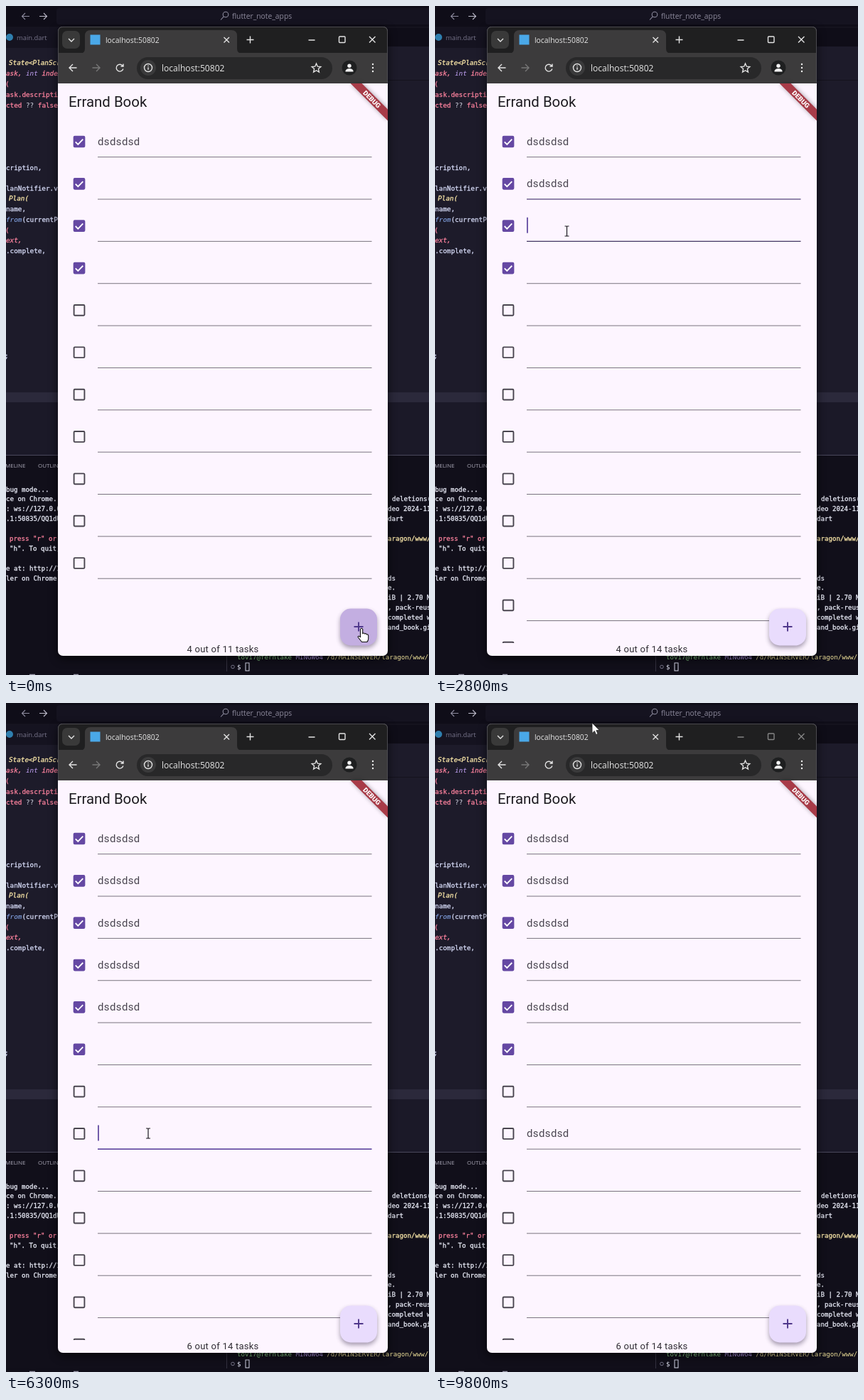
Write an HTML page that moves like this. It is 595x942 px and loops after 9900 ms.

```html
<!DOCTYPE html>
<html lang="en">
<head>
<meta charset="utf-8">
<title>Task list</title>
<style>
  html, body { margin: 0; width: 100%; height: 100%; overflow: hidden; background: #1d1b2a; }
  svg { display: block; width: 595px; height: 942px; }
  text { white-space: pre; }
  .ui { font-family: "Open Sans", "Noto Sans", sans-serif; }
  .app { font-family: Roboto, sans-serif; }
  .mono { font-family: "DejaVu Sans Mono", monospace; font-size: 9.15px; stroke-width: .3px; }
  .code { font-size: 9.3px; }
  .icon { fill: none; stroke: #e3e3e3; stroke-width: 1.4; }
  .dim { stroke: #858585; }
  .row text { font-size: 14.83px; letter-spacing: .463px; fill: #49454f; }
</style>
</head>
<body>
<svg viewBox="0 0 595 942" xmlns="http://www.w3.org/2000/svg">
  <defs>
    <clipPath id="frame"><rect x="73" y="29" width="464" height="886" rx="7"/></clipPath>
    <clipPath id="body"><rect x="73" y="162" width="464" height="735"/></clipPath>
    <filter id="soft" x="-30%" y="-30%" width="160%" height="160%"><feGaussianBlur stdDeviation="3"/></filter>
    <filter id="wide" x="-10%" y="-10%" width="120%" height="120%"><feGaussianBlur stdDeviation="7"/></filter>
  </defs>

  <!-- editor behind the browser -->
  <rect width="595" height="942" fill="#1d1b2a"/>
  <rect width="595" height="57" fill="#0f0d18"/>
  <rect x="71" y="3" width="540" height="23" rx="4" fill="#151320"/>
  <path d="M0 30H595" stroke="#1a1824"/>
  <path d="M537 104.500H595" stroke="#14121d"/>
  <rect y="30" width="73" height="29" fill="#151320"/>
  <g fill="none" stroke="#8d8b9e" stroke-width="1.1">
    <path d="M33 14.500H22.500M27 10l-4.500 4.500 4.500 4.500"/>
    <path d="M47 14.500H57.500M53 10l4.500 4.500-4.500 4.500" stroke="#bdbbca"/>
    <circle cx="309" cy="12" r="3.800"/><path d="M306.300 14.800L302 19.500"/>
  </g>
  <g class="ui" fill="#8d8a9c">
    <text x="318" y="18" font-size="10.300">flutter_note_apps</text>
    <text x="15" y="48" font-size="9.400" fill="#77748a">main.dart</text>
  </g>
  <circle cx="5" cy="44" r="5" fill="#2f7fae"/>
  <rect y="544" width="595" height="14" fill="#2b293b"/>
  <rect y="558" width="595" height="74" fill="#1b1928"/>
  <rect y="632" width="595" height="305" fill="#110f1a"/>
  <path d="M0 632.500H595" stroke="#4a485c"/>
  <path d="M310.500 880V937" stroke="#34313f"/>
  <g class="ui" font-size="8" fill="#a9a7b6">
    <text x="-1" y="650">MELINE</text><text x="45" y="650">OUTLINE</text>
  </g>
  <g id="code"></g>
  <text class="mono" x="325" y="920"><tspan fill="#8fd98d">tovi7@fernlake</tspan><tspan fill="#b397e6"> MINGW64</tspan><tspan fill="#f0e29a"> /d/MAINSERVER/laragon/www/</tspan></text>
  <circle cx="319" cy="930.500" r="2.300" fill="none" stroke="#77758a"/>
  <text class="mono" x="325" y="934" fill="#e4e6f4">$</text>
  <rect x="337" y="925" width="5" height="11" fill="none" stroke="#d4d6e6"/>
  <rect y="937" width="595" height="5" fill="#100e19"/>
  <path d="M33 941.500h8M95 941.500h7" stroke="#9997a8" stroke-width="1.500"/>

  <!-- browser window -->
  <rect x="73" y="33" width="464" height="886" rx="8" fill="#000" opacity=".6" filter="url(#wide)"/>
  <g clip-path="url(#frame)">
    <rect x="73" y="29" width="464" height="886" fill="#fdf5ff"/>
    <rect x="73" y="29" width="464" height="40" fill="#1f1f20"/>
    <rect x="79" y="35" width="25" height="25" rx="7" fill="#393939"/>
    <path d="M104 67q7 0 7-7V42q0-8 8-8H317q8 0 8 8V60q0 7 7 7z" fill="#3c3b3c"/>
    <rect x="73" y="66" width="464" height="43" fill="#3c3b3c"/>
    <rect x="118.500" y="40.500" width="14" height="14" fill="#4aa8e8"/>
    <rect x="184" y="72" width="275" height="31" rx="15.500" fill="#282829"/>
    <circle cx="200" cy="87" r="11" fill="#3a3a3b"/>
    <g class="icon">
      <path d="M88 46l4 4 4-4M306.500 44l7.500 7.500m0-7.500l-7.500 7.500M343.500 42.500v10M338.500 47.500h10"/>
      <path d="M99.500 87H89M94 82l-5 5 5 5"/>
      <path d="M121.500 87H132M127 82l5 5-5 5" stroke="#777"/>
      <path d="M164.200 84.500a4.900 4.900 0 1 0 .6 4M165 81.500v3.500h-3.500"/>
      <circle cx="200" cy="87" r="5.500"/><path d="M200 86.300v3.500M200 83.700v1.200"/>
      <path d="M436.500 81l1.800 4.200 4.500.4-3.400 3 1 4.400-3.900-2.300-3.900 2.300 1-4.400-3.400-3 4.500-.4z"/>
    </g>
    <g id="controls" class="icon">
      <path d="M425.500 48h9M511 43l8.500 8.500m0-8.500l-8.500 8.500"/><rect x="468.500" y="43" width="8.500" height="8.500" rx="1"/>
    </g>
    <circle cx="483" cy="87" r="10.500" fill="#1e1f20"/>
    <g fill="#f1f1f1">
      <circle cx="483" cy="84.200" r="2.700"/><path d="M477.500 92.500v-1.500q1.500-3 5.500-3t5.500 3v1.500z"/>
      <circle cx="516" cy="82" r="1.200"/><circle cx="516" cy="87" r="1.200"/><circle cx="516" cy="92" r="1.200"/>
    </g>
    <g class="ui" fill="#e6e6e6">
      <text x="140" y="51.500" font-size="10.350">localhost:50802</text>
      <text x="219" y="91.500" font-size="12.100">localhost:50802</text>
    </g>

    <g clip-path="url(#body)"><g id="list" class="app"></g></g>
    <rect id="thumb" x="527.500" width="7.500" height="650" fill="#e5dfe8"/>
    <rect id="bar" x="73" y="109" width="464" height="52.500" fill="#e6deee"/>
    <g class="app">
      <text x="88" y="141.500" font-size="20.400" fill="#1d1b20">Errand Book</text>
      <text id="count" x="305" y="910" font-size="13" letter-spacing=".230" text-anchor="middle" fill="#302d34"></text>
    </g>
    <path d="M485 109H501L537 145V161z" fill="#000" opacity=".35" filter="url(#soft)"/>
    <path d="M484.600 109H500.500L537 145.500V161.400z" fill="#a83b48"/>
    <text class="app" transform="translate(514.700 131.300) rotate(45)" y="3.400" font-size="9.460" font-weight="900" text-anchor="middle" fill="#fff">DEBUG</text>
    <rect x="470" y="852" width="52" height="52" rx="15" fill="#3a2c4e" opacity=".45" filter="url(#soft)"/>
    <rect id="fab" x="470" y="848.500" width="52" height="52" rx="15"/>
    <path d="M496 867.500v13M489.500 874h13" stroke="#4f378b" stroke-width="1.900"/>
  </g>
  <path d="M73.500 109V36q0-6.500 6.500-6.500H530q6.500 0 6.500 6.500V109" fill="none" stroke="#4b4a4f"/>

  <g id="tip" class="ui">
    <rect x="167" y="40" width="111" height="26" rx="4" fill="#2c2c2d" opacity=".7"/>
    <text x="177" y="57" font-size="10.600" fill="#b5b5b5">Resume recording</text>
  </g>
  <g id="cursor">
    <path d="M0 0V14.500L3.400 11.400 5.600 16.500 8 15.400 5.900 10.500H10.300z" fill="#fff" stroke="#222" stroke-width=".8"/>
    <path d="M-3 -7H-1Q0 -7 0 -6Q0 -7 1 -7H3M0 -6V6M-3 7H-1Q0 7 0 6Q0 7 1 7H3" fill="none" stroke="#1c1a20" stroke-width="1.200"/>
    <path d="M-1.500 .5Q0 -2 1.700 .5V6.500Q3.700 5.300 4.600 7Q6.500 6 7.400 8Q9.700 7.300 9.700 10V14Q9.500 17 7.800 18.500H.5Q-2 15.500-5 11.500Q-4.800 9-1.500 11.500z" fill="#fff" stroke="#111" stroke-width="1.100"/>
  </g>
</svg>
<script>
const LOOP = 9900, PITCH = 59.35, ROWS = 14;
const $ = id => document.getElementById(id);
const clamp = v => Math.max(0, Math.min(1, v));

// text of the editor and terminals: x, middle y, text, colour, style
const PALE = '#d5daf6', RED = '#f9809c', GOLD = '#f9e6a8', WHITE = '#e8eaf6';
const ITALIC = 'font-style="italic"';
const code = [
  [4, 80, 'State&lt;PlanScreen', GOLD, ITALIC],
  [0, 95, 'ask, <tspan fill="#c4a4f8" stroke="none">int</tspan> index', RED, ITALIC],
  [-1, 110, '(', RED], [0, 125, 'ask.description', RED],
  [0, 140, 'cted <tspan fill="#d9dbe8" stroke="none">??</tspan> false', RED],
  [0, 228, 'cription,', PALE], [0, 257, 'lanNotifier.value', PALE], [4, 271, 'Plan(', GOLD, ITALIC],
  [0, 286, 'name,', PALE],
  [0, 301, '<tspan fill="#8fb4fb" stroke="none" font-style="italic">from</tspan>(currentPlan', PALE],
  [-1, 316, '(', RED], [0, 330, 'ext,', RED, ITALIC], [0, 345, '.complete,', PALE], [-2, 493, ';', PALE]
];
const output = [
  [0, 681, 'bug mode...'], [0, 694, 'ce on Chrome.'], [0, 708, ': ws://127.0.0'], [0, 722, '.1:50835/QQ1dU'],
  [5, 750, 'press "r" or', RED], [5, 764, '"h". To quit,'], [0, 792, 'e at: http://1'], [0, 806, 'ler on Chrome'],
  [543, 694, 'deletions('], [537, 708, 'deo 2024-11'], [537, 722, 'dart'], [537, 750, 'aragon/www/', GOLD],
  [537, 806, 'ds'], [537, 819, 'e.'], [537, 833, 'iB | 2.70 M'], [537, 847, ', pack-reus'],
  [537, 861, 'completed w'], [537, 875, 'and_book.gi']
];
const lines = (list, cls) => list.map(([x, y, s, c = WHITE, style = '']) =>
  `<text class="mono ${cls}" x="${x}" y="${y + 3.3}" fill="${c}" stroke="${c}" ${style}>${s}</text>`).join('');
$('code').innerHTML = lines(code, 'code') + lines(output, '');

// task rows
$('list').innerHTML = Array.from({ length: ROWS }, (_, i) => `
  <g class="row" transform="translate(0 ${191 + i * PITCH})">
    <rect x="95.600" y="-7.400" width="14.800" height="14.800" rx="1.200" stroke-width="1.900"/>
    <path d="M97.700 .3l3.600 3.600 7-7.200" fill="none" stroke="#fff" stroke-width="1.850"/>
    <rect x="129" y="-11" width="59.500" height="22" fill="#cfc0e8"/>
    <text x="129" y="4.800">dsdsdsd</text>
    <line x1="129" x2="514.500" y1="21.700" y2="21.700"/>
    <rect y="-12" width="1.850" height="22" fill="#6750a4"/>
  </g>`).join('');
const rows = [...$('list').children].map(g => {
  const [box, tick, mark, text, line, caret] = g.children;
  return { g, box, tick, mark, text, line, caret };
});

// moments at which each row appears, is ticked, is filled
const born = { 11: 200, 12: 500, 13: 700 };
const ticked = [0, 0, 0, 0, 4300, 4700];
const filled = { 0: 0, 1: 2400, 2: 3100, 3: 3700, 4: 5800, 7: 6400 };
const focus = [[1, 1000, 1300], [0, 1300, 2200], [1, 2200, 2700], [2, 2700, 3400],
  [3, 3400, 4100], [4, 5500, 6100], [7, 6100, 6800]];
const path = [[0, 500, 877], [800, 500, 877], [1000, 190, 250], [1060, 190, 250], [1200, 190, 190],
  [1900, 190, 190], [2200, 187, 250], [2450, 187, 250], [2650, 185.5, 317], [3100, 185.5, 317],
  [3400, 165, 372], [3900, 165, 372], [4200, 103, 428], [4400, 103, 428], [4600, 103, 487],
  [4800, 103, 487], [5000, 145, 440], [5100, 144, 410], [5200, 140, 353], [5500, 170, 430],
  [5900, 170, 430], [6100, 200, 606], [6700, 200, 606], [7000, 220, 607.5], [7700, 220, 607.5],
  [8100, 224, 30], [8400, 223, 20], [9200, 223, 20], [9500, 221, 28], [LOOP, 221, 28]];

function pointer(t) {
  const i = Math.max(1, path.findIndex(p => p[0] > t));
  const [a, ax, ay] = path[i - 1], [b, bx, by] = path[i];
  let k = clamp((t - a) / (b - a));
  k = k * k * (3 - 2 * k);
  return [ax + (bx - ax) * k, ay + (by - ay) * k];
}

const mix = (a, b, k) => `rgb(${a.map((v, i) => Math.round(v + (b[i] - v) * k))})`;
const REST = [121, 116, 126], HOVER = [29, 27, 32], FOCUS = [103, 80, 164];
const show = (el, on) => el.setAttribute('visibility', on ? 'inherit' : 'hidden');
const scrollAt = t => t >= 6800 && t < 7600 ? 95.4 : 0;

function drawRow(r, i, t, hx, hy) {
  const on = ticked[i] <= t, full = filled[i] <= t;
  const live = focus.find(f => f[0] === i && t >= f[1] && t < f[2]);
  const level = Math.max(0, ...focus.filter(f => f[0] === i && t >= f[1])
    .map(f => clamp((t - f[1]) / 200) * (1 - clamp((t - f[2]) / 200))));
  const dy = hy - (191 + i * PITCH - scrollAt(t));
  const over = hx > 129 && hx < 515 && dy > -30 && dy < 22;
  show(r.g, !(born[i] > t));
  r.box.setAttribute('fill', on ? '#6548a3' : 'none');
  r.box.setAttribute('stroke', on ? '#6548a3' : '#49454f');
  show(r.tick, on);
  show(r.text, full);
  show(r.mark, i === 0 && t >= 1600 && t < 2200);
  r.line.setAttribute('stroke', mix(over ? HOVER : REST, FOCUS, level));
  r.line.setAttribute('stroke-width', 1 + .85 * level);
  show(r.caret, live && (t - live[1]) % 1000 < 500);
  r.caret.setAttribute('x', full ? 189 : 129);
}

function draw(t) {
  const [x, y] = pointer(t), [hx, hy] = pointer(Math.max(0, t - 100));
  const scroll = scrollAt(t);
  rows.forEach((r, i) => drawRow(r, i, t, hx, hy));
  $('list').setAttribute('transform', `translate(0 ${-scroll})`);
  show($('bar'), scroll > 0);
  $('thumb').setAttribute('y', 162 + scroll * .88);
  $('thumb').setAttribute('opacity', t < 6800 ? 0 : 1 - clamp((t - 7900) / 300));

  const total = 11 + Object.values(born).filter(b => b <= t).length;
  $('count').textContent = `${ticked.filter(b => b <= t).length} out of ${total} tasks`;

  const onFab = x > 470 && x < 522 && y > 848;
  const pressed = [0, 200, 500, 700].some(b => t >= b && t < b + 150);
  $('fab').setAttribute('fill', onFab ? (pressed ? '#c3aee1' : '#d5c5ee') : '#e9dcfd');

  $('controls').setAttribute('class', t >= 8100 ? 'icon dim' : 'icon');
  $('tip').setAttribute('opacity', t < 8100 ? 0 : clamp((8550 - t) / 330));

  const inList = y > 162 && y < 897;
  const kind = onFab || (inList && x > 90 && x < 116) ? 2 : inList && x > 129 && x < 515 ? 1 : 0;
  $('cursor').setAttribute('transform', `translate(${x} ${y})`);
  [...$('cursor').children].forEach((el, i) => show(el, i === kind));
}

const start = performance.now();
function tick() {
  const t = Math.max(0, performance.now() - start) % LOOP;
  draw(Math.floor(t / 100) * 100);
  requestAnimationFrame(tick);
}
tick();
</script>
</body>
</html>
```
